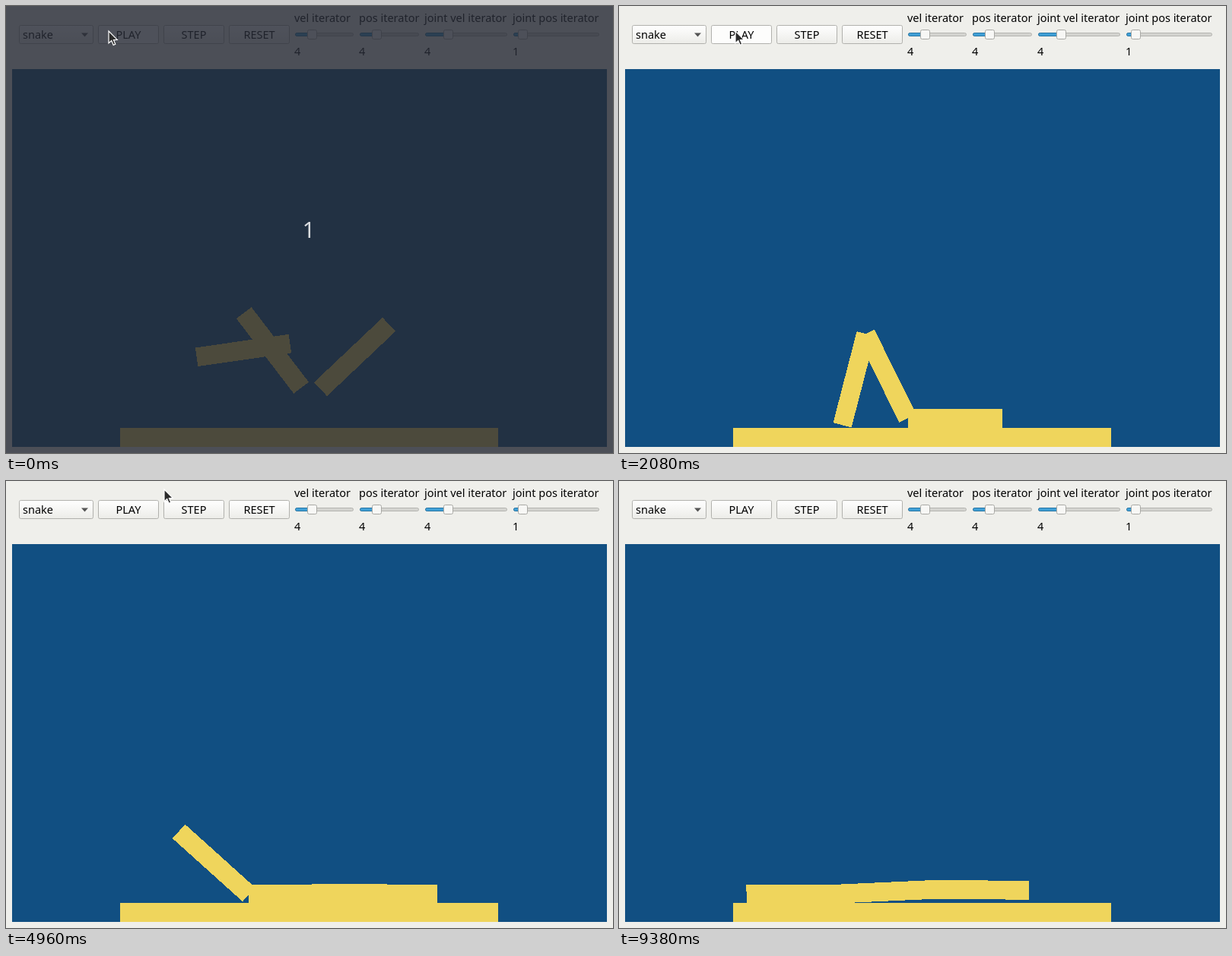
Animation of 798 by 588 pixels, one loop 9.43 s. Source, as an HTML page:

```html
<!DOCTYPE html>
<html lang="en">
<head>
<meta charset="utf-8">
<title>Snake joint demo</title>
<style>
  html, body { margin: 0; width: 798px; height: 588px; overflow: hidden; background: #efefeb; }
  svg { display: block; font: 14.5px "Noto Sans", sans-serif; }
  .button { fill: url(#raised); stroke: #b1b1ad; }
  .button.hover { fill: #fdfdfc; }
  .track { fill: #d4d4d0; stroke: #b5b5b1; }
  .filled { fill: #3f9fd6; stroke: #2b78a6; }
  .knob { fill: #f7f7f5; stroke: #a9a9a5; }
  .center { text-anchor: middle; }
  #world { shape-rendering: crispEdges; fill: #efd55c; }
</style>
</head>
<body>
<svg width="798" height="588">
  <linearGradient id="raised" x2="0" y2="1">
    <stop stop-color="#fff"/>
    <stop offset="1" stop-color="#ecece8"/>
  </linearGradient>
  <g id="controls"></g>
  <g id="world">
    <rect x="8" y="83" width="782" height="497" fill="#114f82"/>
    <rect x="150" y="555" width="497" height="25"/>
  </g>
  <g id="countdown">
    <rect width="798" height="588" fill="rgb(39, 42, 53)" opacity=".81"/>
    <text class="center" x="398" y="305" font-size="29" fill="#d9dcdf">1</text>
  </g>
  <path id="cursor" d="M0 0v16l3.7-3.4 2.5 5.8 2.6-1.1-2.4-5.7 4.8-.2z" fill="#2b2b2b" stroke="#fff" stroke-width="1.2"/>
</svg>
<script>
const LOOP = 9430, START = 210, JOINED = 580, CURSOR_GONE = 6000;
const LENGTH = 124, WIDTH = 24.8;
const find = id => document.getElementById(id);

const linear = u => u;
const fall = u => u * u;
const slow = u => u * (2 - u);
const smooth = u => u * u * (3 - 2 * u);

// A value over time: each step eases from the last value to [time, value, easing]
const motion = (first, ...steps) => t => {
  let time = START, value = first;
  for (const [end, target, ease = smooth] of steps) {
    if (t < end) return value + (target - value) * ease(Math.max(0, (t - time) / (end - time)));
    time = end;
    value = target;
  }
  return value;
};

// Drop, prop up as a tent, collapse, kick the tail up, sink back
const tail = motion(-8.2, [JOINED, -42.2, linear], [2080, -75.5, slow], [3750, 11, fall],
  [4960, 42, slow], [6460, 7.9], [7830, 0], [9380, -.3]);
const middle = motion(52.6, [JOINED, 63.9, linear], [2080, 63.7], [3750, 0, fall],
  [4960, -.7], [7830, -.5], [9380, -2.6]);
const head = motion(-43.4, [JOINED, -47], [1350, 0, fall], [2080, 0], [3210, -2], [4960, .5]);
const footX = motion(388.1, [JOINED, 404.4, linear], [2080, 379.6], [3210, 397.6],
  [3600, 395], [4960, 443.3, slow], [6460, 418.5], [9380, 415.4]);
const footY = motion(502.2, [JOINED, 536.9, fall], [700, 542.4, linear], [2080, 542.4],
  [3210, 544.4], [4960, 542.4], [7830, 542.4], [9380, 537.3]);
const gap = motion(1, [JOINED, 0, slow]);

const cursorX = motion(135, [420, 153], [3500, 153], [3900, 176], [4960, 208], [5750, 103]);
const cursorY = motion(33, [3500, 33], [3900, 4], [4960, 11], [5750, 3]);

const box = (kind, x, y, w, h, r = 2) =>
  `<rect class="${kind}" x="${x + .5}" y="${y + .5}" width="${w - 1}" height="${h - 1}" rx="${r}"/>`;
const text = (label, x, y, kind = '') => `<text class="${kind}" x="${x}" y="${y}">${label}</text>`;

const button = (label, i) =>
  box('button', 121 + 86 * i, 25, 80, 25) + text(label, 161 + 86 * i, 43, 'center');

const slider = (label, value, x, w, knob) =>
  text(label, x - 1, 21) + text(value, x - 1, 65) +
  box('track', x, 35, w, 5) + box('filled', x, 35, knob - x, 5) + box('knob', knob - 6, 31, 13, 13);

find('controls').innerHTML =
  box('button', 17, 25, 98, 25) + text('snake', 22, 43) +
  '<path d="M99 35.5h9l-4.5 5z" fill="#555"/>' +
  ['PLAY', 'STEP', 'RESET'].map(button).join('') +
  slider('vel iterator', 4, 380, 77, 402) +
  slider('pos iterator', 4, 465, 78, 487) +
  slider('joint vel iterator', 4, 551, 108, 581) +
  slider('joint pos iterator', 1, 667, 113, 679);

// Each bar is placed by one of its ends; the tail hangs from its right end
const [tailBar, middleBar, headBar] = [-LENGTH, -LENGTH, 0].map(x => {
  find('world').insertAdjacentHTML('beforeend',
    `<rect x="${x}" y="${-WIDTH / 2}" width="${LENGTH}" height="${WIDTH}"/>`);
  return find('world').lastElementChild;
});

function place(node, x, y, angle = 0) {
  node.setAttribute('transform', `translate(${x} ${y}) rotate(${angle})`);
}

function draw(t) {
  const x = footX(t), y = footY(t), angle = middle(t), apart = gap(t);
  const turn = angle * Math.PI / 180;
  place(middleBar, x, y, angle);
  place(tailBar, x - LENGTH * Math.cos(turn) + 60.6 * apart,
    y - LENGTH * Math.sin(turn) + 40.4 * apart, tail(t));
  place(headBar, x + 25.4 * apart, y + 1.9 * apart, head(t));

  const px = cursorX(t), py = cursorY(t);
  place(find('cursor'), px, py);
  find('cursor').style.display = t < CURSOR_GONE ? '' : 'none';
  find('countdown').style.display = t < START ? '' : 'none';
  for (const node of document.querySelectorAll('.button')) {
    const { left, right, top, bottom } = node.getBoundingClientRect();
    node.classList.toggle('hover', px > left && px < right && py > top && py < bottom);
  }
}

function tick() {
  draw(performance.now() % LOOP);
  requestAnimationFrame(tick);
}
tick();
</script>
</body>
</html>
```
